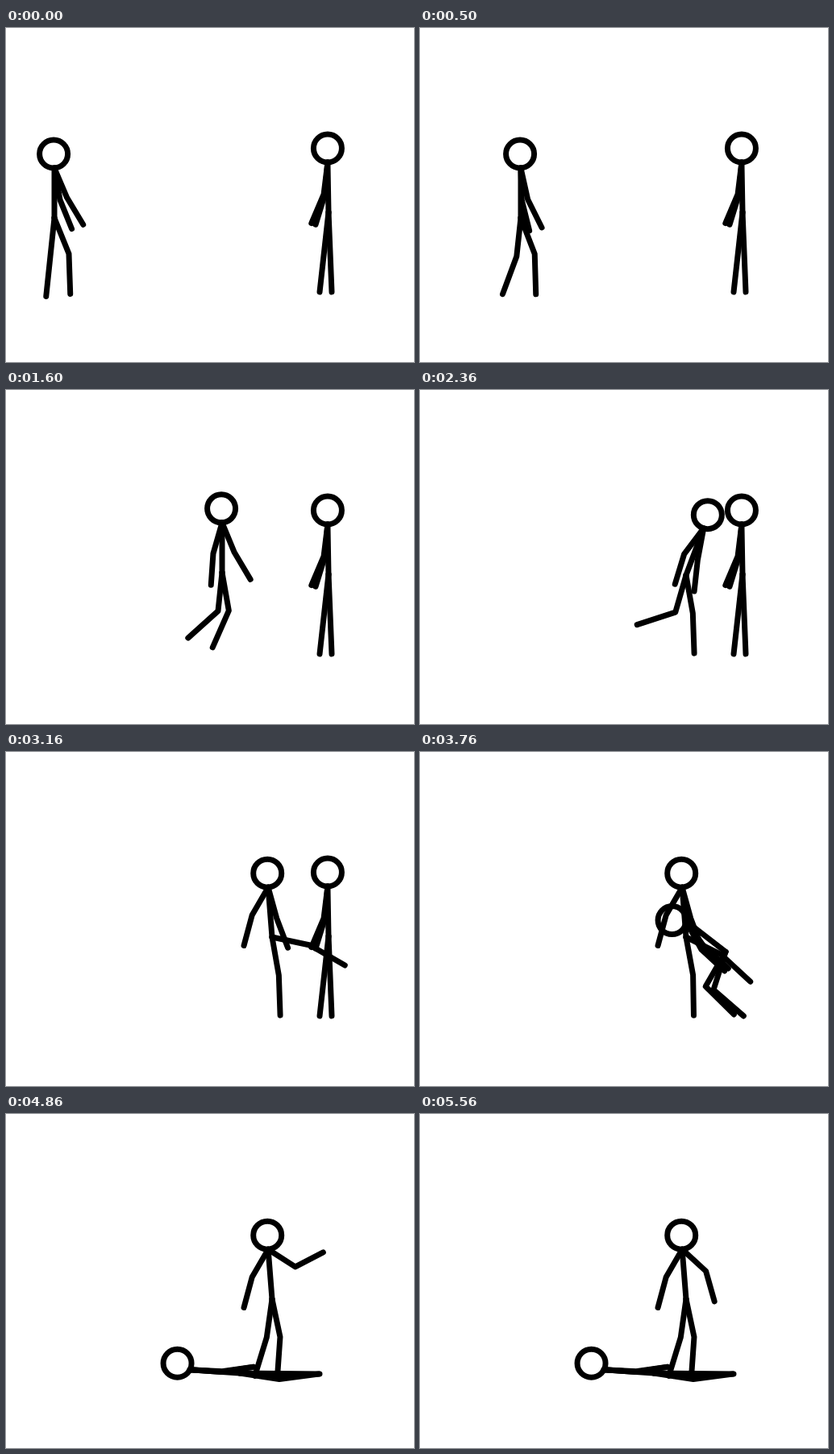
Write an HTML page with a canvas that moves like this. It is 506 px wide and 415 px high and loops after 5660 ms.

```html
<!DOCTYPE html>
<html lang="en">
<head>
<meta charset="utf-8">
<title>Stick figures</title>
<style>
  html, body { margin: 0; width: 100%; height: 100%; overflow: hidden; background: #fff; }
  canvas { display: block; }
</style>
</head>
<body>
<canvas id="stage" width="506" height="415"></canvas>
<script>
const ctx = document.getElementById('stage').getContext('2d');
const LOOP = 5660;
const TORSO = 62, HEAD = 17.5, UPPER_ARM = 40, FOREARM = 39, THIGH = 48, SHIN = 50, HALF_LEG = 49.5;

// Grows from 0 to 1 between two steps.
const ramp = (step, from, to) => Math.min(1, Math.max(0, (step - from) / (to - from)));

// Angles are in degrees from straight down, positive to the right.
function reach([x, y], length, degrees) {
  const angle = degrees * Math.PI / 180;
  return [x + length * Math.sin(angle), y + length * Math.cos(angle)];
}

function line(...points) {
  ctx.beginPath();
  points.forEach(p => ctx.lineTo(...p));
  ctx.stroke();
}

function arm(neck, angle, bend) {
  const elbow = reach(neck, UPPER_ARM, angle);
  line(neck, elbow, reach(elbow, FOREARM, angle + bend));
}

function leg(hip, thigh, shin) {
  const knee = reach(hip, THIGH, thigh);
  line(hip, knee, reach(knee, SHIN, shin));
}

// Leg with its foot on the ground; the knee bends forward, to the left.
function plantedLeg(hip, foot) {
  const dx = foot[0] - hip[0], dy = foot[1] - hip[1], distance = Math.hypot(dx, dy);
  const bulge = Math.sqrt(Math.max(0, HALF_LEG ** 2 - distance ** 2 / 4)) / distance;
  line(hip, [hip[0] + dx / 2 - dy * bulge, hip[1] + dy / 2 + dx * bulge], foot);
}

// Draws torso and head, leaning from upright, and returns the neck.
function body(hip, lean, nod) {
  const neck = reach(hip, TORSO, 180 - lean);
  line(hip, neck);
  ctx.beginPath();
  ctx.arc(...reach(neck, HEAD, 180 - nod), HEAD, 0, 2 * Math.PI);
  ctx.stroke();
  return neck;
}

function drawKicker(step) {
  const arrive = ramp(step, 18, 24), crouch = ramp(step, 16, 24), rise = ramp(step, 24, 32);
  const windUp = ramp(step, 24, 27), kick = ramp(step, 27, 32), stand = ramp(step, 37, 43);
  const raise = ramp(step, 43, 46), lower = ramp(step, 46, 56);
  const stretch = ramp(step, 46, 52), drop = ramp(step, 55, 56);
  const stride = Math.sin(Math.PI * ramp(step, 0, 12));
  const swing = Math.cos(2 * Math.PI * Math.min(step, 16) / 15);

  const hip = [60 + 234 * ramp(step, 0, 18) + 36 * arrive,
               236 - 11 * ramp(step, 6, 18) + 5 * arrive];
  const neck = body(hip, 20.5 * crouch - 25 * rise, 20 * (crouch - rise) - 3);

  arm(neck, 16 + 7 * swing - 33 * crouch + 26 * rise + 46 * raise - 14 * lower,
      12 - 4 * swing - 4 * crouch + rise + 100 * raise - 90 * stretch - 47 * drop);
  arm(neck, 10 - 26 * ramp(step, 0, 16) - 21 * crouch + 7 * rise,
      12 + 8 * crouch - 5 * rise);

  leg(hip, -6 + 28 * stride - 10 * crouch - 29 * windUp + 123 * kick - 86 * stand,
      -6 + 8 * stride - 42 * ramp(step, 8, 16) - 24 * crouch - 20 * windUp + 152 * kick - 77 * stand);
  leg(hip, 22 - 12 * ramp(step, 0, 12) - 24 * stride + 2 * stand,
      2 - 34 * Math.sin(Math.PI * ramp(step, 0, 22)) - 6 * stand);
}

function drawVictim(step) {
  const buckle = ramp(step, 32, 37), topple = ramp(step, 37, 43), settle = ramp(step, 43, 49);

  const hip = [400 - 4 * buckle - 102 * topple - 4 * settle,
               229 + 9 * buckle + 62 * topple + 22 * settle];
  const neck = body(hip, -1 - 44 * buckle - 43 * topple + 2 * settle,
                    -85 * buckle - 5 * topple + 27 * settle);

  arm(neck, -7 + 27 * buckle + 50 * topple + 16 * settle, -16 + 36 * buckle - 7 * topple);
  arm(neck, -5 + 30 * buckle + 62 * topple, -12 + 32 * buckle - 43 * topple + 34 * settle);

  plantedLeg(hip, [389 + 2 * topple - 2 * settle, 328 - 12 * topple + 7 * settle]);
  plantedLeg(hip, [404 - 16 * topple, 328 - 5 * settle]);
}

const startTime = performance.now();

function draw() {
  const time = Math.max(0, performance.now() - startTime) % LOOP;
  // Ten poses a second; the one at 2300 ms lasts only 60 ms.
  const step = Math.floor((time < 2360 ? time : time + 40) / 100);
  ctx.fillStyle = '#fff';
  ctx.fillRect(0, 0, 506, 415);
  ctx.strokeStyle = '#000';
  ctx.lineWidth = 7;
  ctx.lineCap = ctx.lineJoin = 'round';
  drawKicker(step);
  drawVictim(step);
  requestAnimationFrame(draw);
}
draw();
</script>
</body>
</html>
```
